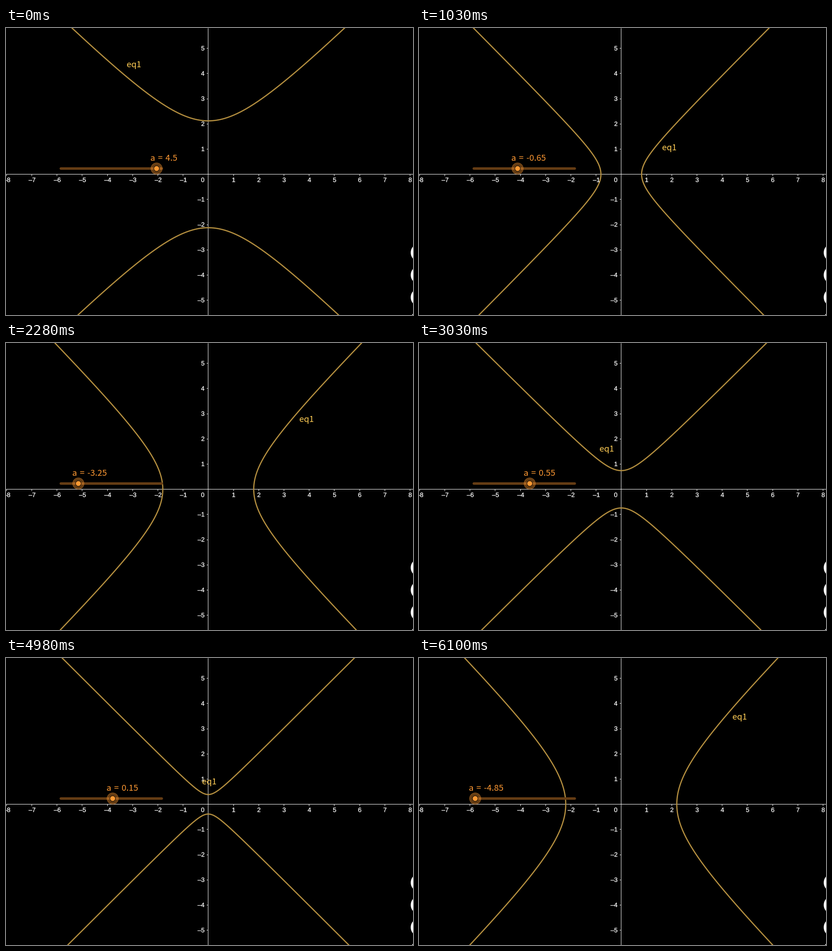
These frames come from a looping animation (891x629 px, 6170 ms). A matplotlib script:

```python
import numpy as np
import matplotlib.pyplot as plt
from matplotlib.animation import FuncAnimation
from matplotlib.patches import Circle, PathPatch
from matplotlib.path import Path
from matplotlib.textpath import TextPath
from matplotlib.transforms import Affine2D

W, H, DPI = 891, 629, 64
LOOP, TICK = 6170, 10
OX, OY, UNIT = 442.8, 320.6, 55.2
AXIS_X, AXIS_Y = 442, 320
SLIDER_X0, SLIDER_Y, SLIDER_UNIT = 230.2, 308, 22.1
ORANGE, GOLD, CURVE = "#ff9933", "#ffcc55", "#b38e3f"
UI_FONT = ["Noto Sans CJK JP", "DejaVu Sans"]
WIDE_SPACE = "\u2004"

# The picture advances in uneven steps of about 70 ms.
STEP_TIMES = [0, 70, 620, 690, 1300, 1370, 1940, 1990, 2540, 2610, 3170,
              3240, 3780, 3860, 4420, 4490, 5050, 5120, 5680, 5750, 6100]
STEP_INDEX = [0, 1, 9, 10, 19, 20, 28, 29, 37, 38, 46,
              47, 55, 56, 64, 65, 73, 74, 82, 83, 88]

# The slider bounces between -5 and 5, resting briefly at each end.
KEY_STEPS = [0, 7, 22, 27.5, 28, 44, 57, 57.5, 59, 72, 87, 88]
KEY_VALUES = [4.5, 2.1, -3.1, -5, -5, 0.55, 5, 5, 4.5, 0.15, -5, -4.85]


def pt(px):
    return px * 72 / DPI


def to_px(x, y):
    return OX + UNIT * x, OY - UNIT * y


def label_path(text, x, y, align):
    """Axis label; y is the baseline, align is the share of width left of x."""
    path = TextPath((0, 0), text, size=13.8, prop={"family": "Liberation Sans"})
    box = path.get_extents()
    dx = x - box.x0 - align * box.width
    return path.transformed(Affine2D().scale(1, -1).translate(dx, y))


def number(n):
    return str(n) if n >= 0 else f"\u2013{-n}"


def slider_value(t):
    step = int(np.interp(t + 5, STEP_TIMES, STEP_INDEX))
    return round(np.interp(step, KEY_STEPS, KEY_VALUES) * 20) / 20 + 0.0


def hyperbola(a):
    """Both branches of y^2 - x^2 = a, in pixels."""
    s = np.linspace(-8.2, 8.2, 401)
    r = np.sqrt(s * s + abs(a))
    along = np.concatenate([s, [np.nan], s])
    across = np.concatenate([r, [np.nan], -r])
    return to_px(along, across) if a >= 0 else to_px(across, along)


fig = plt.figure(figsize=(W / DPI, H / DPI), dpi=DPI, facecolor="black")
ax = fig.add_axes([0, 0, 1, 1])
ax.set_xlim(0, W)
ax.set_ylim(H, 0)
ax.axis("off")

# Axes, ticks and numbers
lines_x = [0, W, np.nan, AXIS_X, AXIS_X, np.nan]
lines_y = [AXIS_Y, AXIS_Y, np.nan, 0, H, np.nan]
labels = [label_path("0", 434, 337.5, 1)]
for n in range(-8, 9):
    if n == 0:
        continue
    x, y = to_px(n, n)
    lines_x += [x - 0.5, x - 0.5, np.nan]
    lines_y += [AXIS_Y, AXIS_Y + 4, np.nan]
    labels.append(label_path(number(n), x + 0.5, 337.5, 0.5))
    if abs(n) <= 5:
        lines_x += [AXIS_X - 3, AXIS_X, np.nan]
        lines_y += [y - 0.5, y - 0.5, np.nan]
        labels.append(label_path(number(n), 434.2, y + 4.5, 1))
ax.plot(lines_x, lines_y, color="white", lw=pt(1), snap=True,
        solid_capstyle="butt", zorder=1)
ax.add_patch(PathPatch(Path.make_compound_path(*labels), fc="white", ec="white",
                       lw=pt(0.3), zorder=3))

# Round buttons cut off by the right edge
for y in (492.3, 541.3, 590.3, 639.3):
    ax.add_patch(Circle((906, y), 20, fc="white", lw=0, zorder=6))

# Slider track
ax.plot([SLIDER_X0 - 5 * SLIDER_UNIT, SLIDER_X0 + 5 * SLIDER_UNIT], [SLIDER_Y] * 2,
        color="#663d14", lw=pt(5.5), solid_capstyle="round", zorder=4)

curve, = ax.plot([], [], color=CURVE, lw=pt(2.6), zorder=2)
halo = Circle((0, SLIDER_Y), 12.5, fc=(1, 0.6, 0.2, 0.4), ec=(1, 0.6, 0.2, 0.4),
              lw=pt(1), zorder=5)
knob = Circle((0, SLIDER_Y), 6, fc=ORANGE, ec="black", lw=pt(1), zorder=6)
ax.add_patch(halo)
ax.add_patch(knob)
value_text = ax.text(0, 291.3, "", color=ORANGE, family=UI_FONT,
                     fontsize=pt(18.6), va="baseline", zorder=7)
curve_text = ax.text(0, 0, "eq1", color=GOLD, family=UI_FONT,
                     fontsize=pt(18.5), va="baseline", zorder=7)


def place_curve_label(a):
    far, near = 2 * np.sqrt(abs(a)), np.sqrt(3 * abs(a))
    if a >= 0:
        x, y = to_px(-near, far)
        curve_text.set_position((x + 23.6, y - 0.5))
    else:
        x, y = to_px(far, near)
        curve_text.set_position((x + 0.3, y + 24.7))


def update(i):
    a = slider_value(i * TICK)
    x = SLIDER_X0 + SLIDER_UNIT * a
    curve.set_data(*hyperbola(a))
    halo.center = knob.center = (x, SLIDER_Y)
    value_text.set_text(f"a{WIDE_SPACE}={WIDE_SPACE}{a:g}")
    value_text.set_x(x - 13.6)
    place_curve_label(a)
    return curve, halo, knob, value_text, curve_text


anim = FuncAnimation(fig, update, frames=LOOP // TICK, interval=TICK,
                     repeat=True, repeat_delay=0, blit=False)
plt.show()
```
